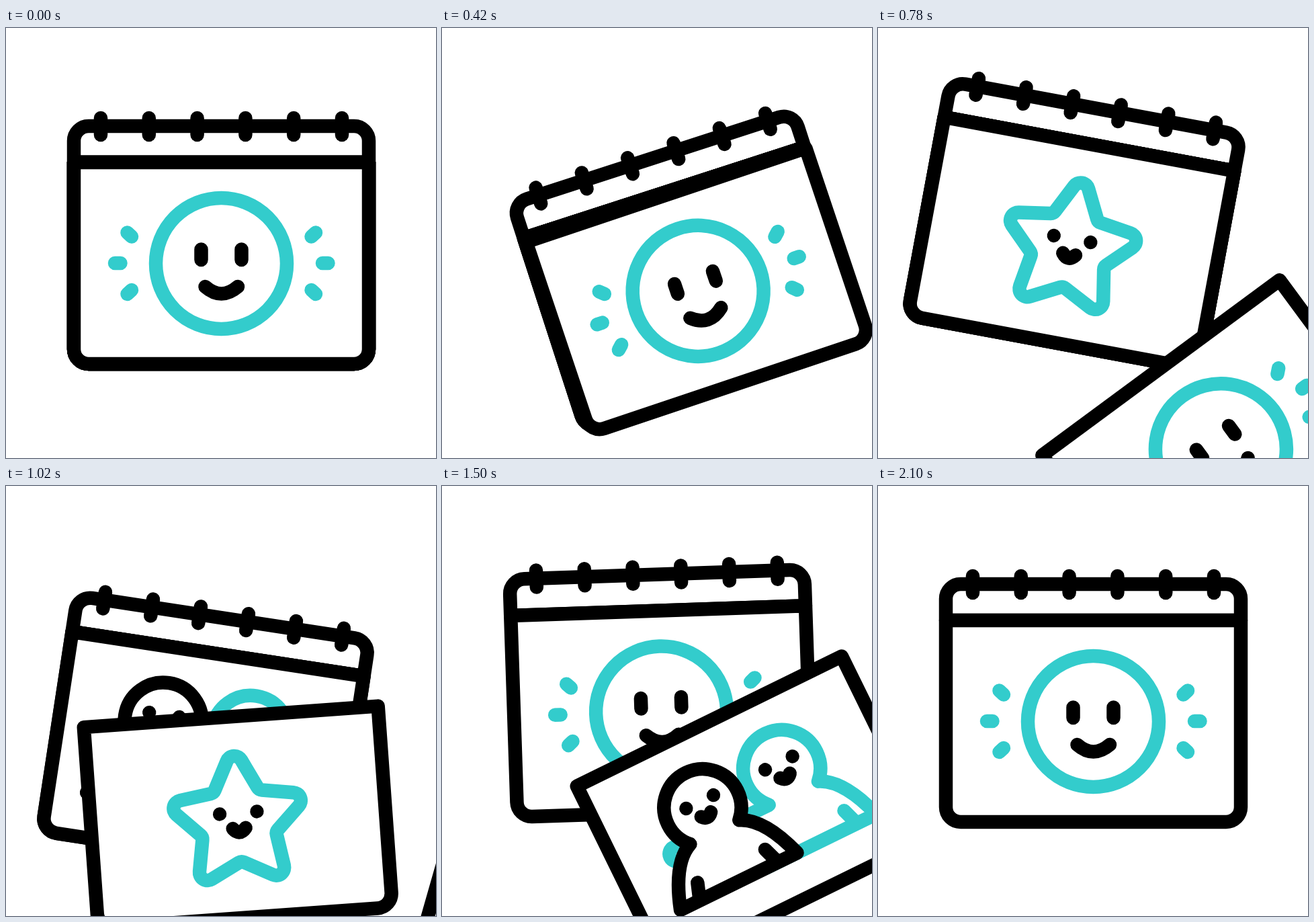
Animation of 640x640 px, one loop 2400 ms. Source, as an HTML page with a canvas:

```html
<!DOCTYPE html>
<html lang="en">
<head>
<meta charset="utf-8">
<title>Calendar pages</title>
<style>
html, body { margin: 0; width: 100%; height: 100%; overflow: hidden; background: #fff }
canvas { display: block; width: 640px; height: 640px }
</style>
</head>
<body>
<canvas width="640" height="640"></canvas>
<script>
const ctx = document.querySelector('canvas').getContext('2d');
const BLACK = '#000', TEAL = '#33cccc';
const LOOP = 2400, REST = 2100, STEP = 20;
const FALL = 772;

// Calendar swing: [time, value, slope per ms]
const TILT = [[0, 0, 0], [400, -18.1, 0], [780, 10.5, .085], [880, 15.8, 0],
  [1020, 8.66, -.071], [1330, -7.9, 0], [1672, 4.2, 0], [REST, 0, 0]];
const LIFT = [[0, 0, 0], [400, 47.5, 0], [735, -32, 0], [1025, 50.5, 0],
  [1435, -18, 0], [1700, 6, 0], [REST, 0, 0]];

const smooth = u => u * u * (3 - 2 * u);
const rad = deg => deg * Math.PI / 180;

function hermite(keys, t) {
  const i = Math.max(1, keys.findIndex(k => k[0] >= t));
  const [t0, v0, s0] = keys[i - 1], [t1, v1, s1] = keys[i];
  const d = t1 - t0, u = (t - t0) / d, w = 1 - u;
  return v0 + (v1 - v0) * smooth(u) + d * u * w * (s0 * w - s1 * u);
}

function line(path, color = BLACK, fill) {
  const p = new Path2D(path);
  if (fill) { ctx.fillStyle = '#fff'; ctx.fill(p); }
  ctx.strokeStyle = color;
  ctx.stroke(p);
}

function dot(x, y) {
  ctx.fillStyle = BLACK;
  ctx.beginPath();
  ctx.arc(x, y, 10.2, 0, 7);
  ctx.fill();
}

function starPath() {
  const p = new Path2D();
  const at = i => {
    const r = i % 2 ? 57.5 : 114, a = rad(36 * i - 90);
    return [320.5 + r * Math.cos(a), 358 + r * Math.sin(a)];
  };
  const [x0, y0] = at(0), [x1, y1] = at(1);
  p.moveTo((x0 + x1) / 2, (y0 + y1) / 2);
  for (let i = 1; i <= 10; i++) p.arcTo(...at(i), ...at(i + 1), i % 2 ? 8 : 12);
  p.closePath();
  return p;
}
const STAR = starPath();

function smile() {
  line('M418 350.5a97.5 97.5 0 1 1-195 0a97.5 97.5 0 1 1 195 0Z', TEAL);
  line('M290.5 329.5V345M350.5 329.5V345M296.5 385Q320.5 406 345 385');
  line('M162 350H170.5M471 350H479.5M180.5 304.5L187 310.5M180.5 396L187 390' +
    'M461 304.5L454.5 310.5M461 396L454.5 390', TEAL);
}

function star() {
  ctx.strokeStyle = TEAL;
  ctx.stroke(STAR);
  dot(293.5, 343.5);
  dot(349, 343.5);
  line('M311.5 366.5Q321 378.5 330.5 366.5');
}

function face(x) {
  dot(x - 22.6, 301.5);
  dot(x + 22.6, 301.5);
  line(`M${x - 8} 322.5Q${x} 332 ${x + 8} 322.5`);
}

function people() {
  line('M230 367H190a11 11 0 0 1 0-22L300 351H345.4A57.5 57.5 0 1 1 426.6 351.8' +
    'Q461 366 482.6 433.4H300M442 408L450 431', TEAL);
  line('M214.4 351.8A57.5 57.5 0 1 1 295.6 351.8Q330 366 351.6 433.4H158.4Q180 366 214.4 351.8Z',
    BLACK, true);
  line('M199 408L191 431M311 408L319 431');
  face(255);
  face(386);
}

function header() {
  line('M101 200V168a22 22 0 0 1 22-22H518a22 22 0 0 1 22 22V200Z', BLACK, true);
  for (let i = 0; i < 6; i++) line(`M${141 + 71.8 * i} 134V159`);
}

// Bottom to top, with the time each page tears off
const PAGES = [[smile, Infinity], [people, 1237], [star, 837], [smile, 383]];

function page(content, start, t) {
  const u = Math.max(0, (t - start) / FALL);
  if (u >= 1) return;
  const turn = 90 * smooth(u);
  ctx.save();
  ctx.translate(522 + 1.9 * turn, 183 + 3.54 * turn);
  ctx.rotate(rad(-turn));
  ctx.translate(-522, -183);
  line('M101 200H540V478a22 22 0 0 1-22 22H123a22 22 0 0 1-22-22Z', BLACK, true);
  content();
  ctx.restore();
}

function draw(t) {
  ctx.setTransform(1, 0, 0, 1, 0, 0);
  ctx.fillStyle = '#fff';
  ctx.fillRect(0, 0, 640, 640);
  ctx.lineWidth = 20.5;
  ctx.lineCap = ctx.lineJoin = 'round';
  ctx.translate(320.5, 167 + hermite(LIFT, t));
  ctx.rotate(rad(hermite(TILT, t)));
  ctx.translate(-320.5, -167);
  header();
  for (const [content, start] of PAGES) page(content, start, t);
}

const begin = performance.now();
function tick() {
  const t = (performance.now() - begin) % LOOP;
  draw(Math.min(REST, Math.floor(t / STEP) * STEP));
  requestAnimationFrame(tick);
}
tick();
</script>
</body>
</html>
```
